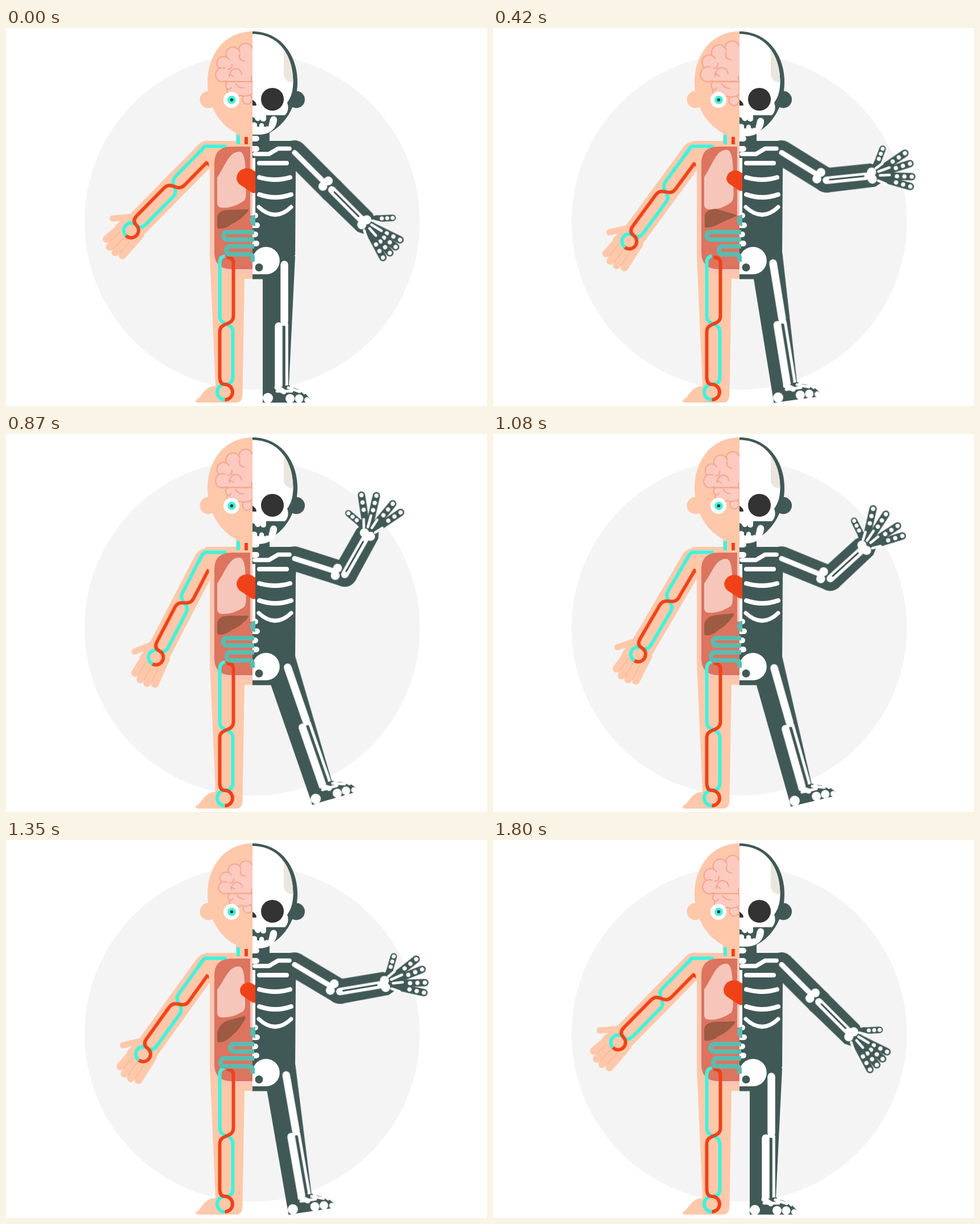
An HTML page for the animation above (1830 ms loop, 845 by 663 pixels).

```html
<!DOCTYPE html>
<html lang="en">
<head>
<meta charset="utf-8">
<title>Anatomy</title>
<style>
html, body { margin: 0; width: 100%; height: 100%; overflow: hidden; background: #fff; }
svg { display: block; width: 100%; height: 100%; }

.skin { fill: #ffc8aa; }
.dark { fill: #415956; }
.bone { fill: #fff; }
.skin-line, .dark-line, .bone-line, .vein, .artery, .gut, .fold { fill: none; }
.skin-line { stroke: #ffc8aa; stroke-linecap: round; }
.dark-line { stroke: #415956; stroke-linecap: round; }
.bone-line { stroke: #fff; stroke-linecap: round; stroke-linejoin: round; }
.vein { stroke: #3ef3dc; stroke-width: 6; }
.artery { stroke: #f04218; stroke-width: 6; }
.gut { stroke: #5bbbb0; stroke-width: 8; }
.lobe { fill: #fdcac0; stroke: #f2a58c; stroke-width: 2; }
.fold { stroke: #f2a58c; stroke-width: 2; }

/* 1800 ms of motion, then a 30 ms rest */
.swing, .cycle, .heart { animation: swing 1830ms steps(30) -2ms infinite; }
@keyframes swing {
  0%, 98.361%, 100% { transform: translateY(0px) rotate(0deg); }
  49.18% { transform: translateY(var(--y, 0px)) rotate(var(--a, 0deg)); }
}
.cycle { animation-name: cycle; animation-timing-function: steps(15); }
@keyframes cycle {
  0%, 49.18%, 98.361%, 100% { transform: scale(1, 1); }
  24.59% { transform: scale(var(--up)); }
  73.77% { transform: scale(var(--down)); }
}
.brain { transform-origin: 433px 94px; --up: 1.06, 1.07; --down: .92, .86; }
.lung { transform-origin: 371px 270px; --up: 1.02, 1.07; --down: .97, .91; }

.heart { animation-name: beat; transform-origin: 436px 268px; }
@keyframes beat {
  0%, 49.18% { transform: scale(1); animation-timing-function: ease-in; }
  24.59%, 73.77% { transform: scale(.81); animation-timing-function: ease-out; }
  98.361%, 100% { transform: scale(1); }
}
.liver { animation-name: liver; }
@keyframes liver {
  0%, 49.18%, 98.361%, 100% { d: path("M371 331 Q374 319 392 319 L425 318 Q428 319 421 326 Q409 339 396 344 Q386 353 374 352 Q371 352 371 348 Z"); }
  24.59% { d: path("M372 327 Q376 317 392 317 L426 328 Q430 330 424 332 Q410 337 396 344 Q386 350 374 350 Q372 350 372 346 Z"); }
  73.77% { d: path("M371 339 Q374 321 392 316 L418 309 Q422 309 420 314 Q409 334 398 342 Q386 355 375 355 Q371 355 371 350 Z"); }
}
.gut-top { animation-name: gut-top; }
@keyframes gut-top {
  0%, 49.18%, 98.361%, 100% { d: path("M436 358 H388 C380 358 380 371 388 371 H436"); }
  24.59% { d: path("M436 358 H381 C373 358 373 371 381 371 H436"); }
  73.77% { d: path("M436 358 H400 C392 358 392 371 400 371 H436"); }
}
.gut-low { animation-name: gut-low; }
@keyframes gut-low {
  0%, 49.18%, 98.361%, 100% { d: path("M436 383 H393 C385 383 385 397 393 397 H427 Q433 397 433 403 V410"); }
  24.59% { d: path("M436 383 H403.5 C395.5 383 395.5 397 403.5 397 H427 Q433 397 433 403 V410"); }
  73.77% { d: path("M436 383 H383 C375 383 375 397 383 397 H427 Q433 397 433 403 V410"); }
}
</style>
</head>
<body>
<svg viewBox="0 0 845 663">
  <defs>
    <clipPath id="left"><rect width="433" height="663"/></clipPath>
    <clipPath id="over"><rect width="438" height="663"/></clipPath>
    <clipPath id="right"><rect x="433" width="412" height="663"/></clipPath>
    <path id="head" d="M433 6 C483 6 512 48 512 95 C512 148 476 191 433 191 C390 191 354 148 354 95 C354 48 383 6 433 6 Z"/>
    <path id="cranium" d="M433 10.500 C481 10.500 504.500 50 504.500 95 C504 114 500 122 494 131 C497 139 496 147 490 153 H457 V159 Q457 164 452 164 Q448 164 447 160 Q445 164 441 163 Q438 162 437 158 L433 156 Z"/>
    <clipPath id="skull"><use href="#cranium"/></clipPath>
    <g id="finger">
      <path class="dark-line" stroke-width="13" d="M14 0 H70"/>
      <g class="bone"><circle cx="44" r="3.8"/><circle cx="57" r="3.8"/><circle cx="70" r="3.8"/></g>
    </g>
  </defs>

  <circle cx="432.5" cy="340" r="294.5" fill="#f4f4f4"/>

  <!-- flesh side -->
  <g transform="translate(364.400 229) rotate(134.6)">
    <g class="swing" style="--a:-17.7deg">
      <g transform="rotate(-134.6) translate(-10.400 -10) rotate(134.6)">
        <path class="skin-line" stroke-width="43" d="M0 0 H180"/>
        <path class="skin-line" stroke-width="11" d="M170 13 L199 38"/>
        <path class="skin-line" stroke-width="13.5" d="M190 16 L232 20 M190 6 L238 6.5 M190 -6 L238 -7 M185 -17 L233 -20"/>
        <path class="skin" d="M165 21 L205 26 L212 -25 L180 -21 Z"/>
        <path class="fold" style="stroke:#eab295;stroke-width:1" d="M206 12 L232 13.5 M207 0 H237 M206 -12 L233 -13.5"/>
        <path class="vein" stroke-linecap="round" d="M-4 11 H10"/>
        <path class="vein" d="M-4 11 H69 C87 11 79 -11 97 -11 H165 Q178 -11 178 0 A13 13 0 0 0 204 0"/>
        <path class="artery" d="M12 -18 L14 -11 H69 C87 -11 79 11 97 11 H165 Q178 11 178 0 A13 13 0 0 1 204 0"/>
      </g>
    </g>
  </g>
  <path fill="#f8c4b6" d="M361 250 V395 Q362 431 398 431 H433 V250 Z"/>
  <path class="skin" d="M433.500 198 H350 L358 250 V400 L368 628 C352 628 346 641 339 649 Q333 652 333 655 Q334 657 340 657 H404 Q415 657 415.500 643 L419 440 H433.500 Z"/>
  <path fill="#f8c4b6" d="M362 250 V393 Q364 431 398 431 H433 V250 Z"/>
  <rect class="skin" x="404" y="175" width="29.5" height="26"/>
  <path class="vein" d="M408 188 V204"/>
  <path class="artery" d="M422 191 V204"/>
  <path class="vein" stroke-linejoin="round" stroke-linecap="round" d="M385 207.500 H349 L344 213"/>

  <circle class="skin" cx="355.500" cy="125.500" r="15"/>
  <use class="skin" href="#head" clip-path="url(#left)"/>
  <g clip-path="url(#left)">
    <g class="cycle brain">
      <g class="lobe">
        <circle cx="424" cy="125" r="8.500"/>
        <path d="M433 94 H389 Q383 101 389 107 Q387 117 398 117 Q404 122 411 118 Q421 122 433 115 Z"/>
        <circle cx="421" cy="39" r="12"/>
        <circle cx="399" cy="46" r="12.500"/>
        <circle cx="382.500" cy="62" r="11.800"/>
        <circle cx="380.500" cy="82" r="12.300"/>
      </g>
      <path fill="#fdcac0" d="M440 34 L416 41 L402 48 L386 62 L384 92 H440 Z"/>
      <path class="fold" d="M383 94 H430 M392 86 Q394 71 404 71 Q413 72 414 82 M411 45 Q407 57 420 58 M389 72 Q398 73 397 63 M391 81 Q397 82 400 86 M433 94 Q430 91 432 84 M389 107 Q394 109 396 103 M403 97 Q409 106 418 105"/>
    </g>
  </g>
  <circle cx="396" cy="126" r="14" fill="#fff"/>
  <circle cx="396.500" cy="126" r="7.300" fill="#3ef3dc"/>
  <circle cx="396.500" cy="126" r="2.800" fill="#333"/>

  <path fill="#dc745f" d="M433 208 H396 Q366 208 366 238 V393 Q366 423 396 423 H433 Z"/>
  <rect x="429" y="208" width="5" height="121" fill="#f6c6ba"/>
  <path class="cycle lung" fill="#f6c6ba" d="M371 262 C386 241 391 217 410 217 C420 217 421 240 421 262 C421 285 424 299 417 304 Q397 317 378 315 Q371 314 371 307 Z"/>
  <path class="cycle liver" fill="#9c5b42" d="M371 331 Q374 319 392 319 L425 318 Q428 319 421 326 Q409 339 396 344 Q386 353 374 352 Q371 352 371 348 Z"/>

  <g transform="translate(387.500 402) rotate(90)">
    <path class="vein" d="M-2 3 Q-1 12 10 12 H103 C121 12 113 -11 131 -11 H210 Q223 -11 223 3 A13.500 13.500 0 0 0 250 3"/>
    <path class="artery" d="M0 0 Q0 -12 10 -12 H103 C121 -12 113 12 131 12 H210 Q223 12 223 3 A13.500 13.500 0 0 1 250 3"/>
  </g>

  <!-- bone side -->
  <path class="dark" d="M433 198 H512 L509 250 L508 398 L470 440.500 H433 Z"/>
  <rect class="dark" x="433" y="178" width="30" height="24"/>
  <circle class="dark" cx="510" cy="125.500" r="15"/>

  <g transform="translate(475 395)">
    <g class="swing" style="--a:-19.8deg">
      <path class="dark" d="M-24 5 H33 L22 232 L26 262 H-24 Z"/>
      <path class="bone-line" stroke-width="13.500" d="M14 20 V119 M4 128 V236"/>
      <path class="bone-line" stroke-width="5.500" d="M8 124.500 H18 V231"/>
      <path class="dark-line" stroke-width="1.500" d="M15 129 V230"/>
      <g transform="translate(-15 254)">
        <g class="swing" style="--a:3.3deg">
          <path class="dark" d="M30 -22 H37 Q47 -24 58 -17 L73 0 Q76 8 67 8 H-9 L-5 -8 Z"/>
          <path class="bone-line" stroke-width="9" d="M16 -19 L28 -11"/>
          <path class="bone-line" stroke-width="5" d="M16 -12 H42 M36 -18 L56 -11 M41 -21 Q55 -20 64 -9"/>
          <g class="bone"><circle r="9"/><circle cx="39" cy="1" r="8"/><circle cx="55" cy="1" r="7.500"/><circle cx="69" cy="3.500" r="5"/></g>
        </g>
      </g>
    </g>
  </g>

  <g transform="translate(507 218.500) rotate(45)">
    <g class="swing" style="--a:-28.4deg">
      <path class="dark-line" stroke-width="43" d="M0 0 H92"/>
      <g transform="translate(92.500 0)">
        <g class="swing" style="--a:-80.6deg">
          <circle class="dark" r="21.500"/>
          <path class="dark" d="M0 -21.500 H80 L92 -16 L96 14 L84 20 L0 21.500 Z"/>
          <path class="bone-line" stroke-width="13" d="M0 0 H76"/>
          <path class="dark-line" stroke-width="2.800" d="M6 -.5 H66"/>
          <g transform="translate(80.500 0)">
            <path class="dark-line" stroke-width="12" d="M4 -8 L11 -20"/>
            <g transform="translate(11 -20) rotate(-48)">
              <g class="swing" style="--a:-33deg">
                <path class="dark-line" stroke-width="11.500" d="M0 0 H28"/>
                <g class="bone"><circle cx="9" r="3.600"/><circle cx="18.500" r="3.600"/><circle cx="28" r="3.600"/></g>
              </g>
            </g>
            <g transform="rotate(-19)"><use class="swing" style="--a:-20deg" href="#finger"/></g>
            <g transform="rotate(-7)"><use class="swing" style="--a:-10deg" href="#finger"/></g>
            <g transform="rotate(5)"><use class="swing" style="--a:5deg" href="#finger"/></g>
            <g transform="rotate(17)"><use class="swing" style="--a:10deg" href="#finger"/></g>
            <path class="bone-line" stroke-width="4.500" d="M8 -12 L20 -19 M12 -6 L32 -11 M14 1 L31 2 M10 10 L23 17"/>
            <circle class="bone" cy="-6.200" r="8"/>
            <circle class="bone" cy="6.200" r="8"/>
          </g>
        </g>
      </g>
      <path class="bone-line" stroke-width="9" d="M0 0 H74"/>
      <circle class="bone" cx="77" cy="-6.800" r="7.800"/>
      <circle class="bone" cx="77" cy="6.800" r="7.800"/>
    </g>
  </g>

  <use class="dark" href="#head" clip-path="url(#right)"/>
  <use class="bone" href="#cranium"/>
  <path fill="#ebe6dd" clip-path="url(#skull)" d="M488 30 H510 V95 H500 Q488 92 488 80 Z"/>
  <circle cx="468" cy="125" r="20" fill="#333"/>
  <path fill="#333" d="M433 126 Q440 130 440 136 H433 Z"/>
  <g clip-path="url(#right)">
    <path class="bone swing" style="--y:6px" d="M433 166 Q438 164 441 168 V172 Q443 175 445 172 V169 Q449 164 453 169 V172 Q455 175 458 172 L461 173 L464 160 Q466 154 472 155 Q477 157 476 163 C474 178 462 187 445 187 H433 Z"/>

    <path class="bone-line" stroke-width="10" d="M433 194 H440 M433 212 H440 M433 329 H438 M433 346 H441 M433 362 H438 M433 378 H440"/>
    <rect class="bone" x="433" y="228" width="5" height="98"/>
    <path class="bone-line" stroke-width="7.500" d="M437 221 H462 L478 211.500 H498"/>
    <path class="bone-line" stroke-width="8" d="M445 237 H493 M445 262 Q473 270 499 262 M445 292 Q473 302 501 292"/>
    <path class="bone-line" stroke-width="7" d="M444 314 Q473 341 501 314"/>
    <path class="bone" d="M433 405 A24 24 0 1 1 457 432 H433 Z"/>
    <circle class="dark" cx="444.500" cy="420" r="7"/>
  </g>

  <!-- organs crossing the midline -->
  <path fill="#5bbbb0" d="M438 327.500 A9.500 10 0 0 0 438 347.500 Z"/>
  <path class="gut cycle gut-top" d="M436 358 H388 C380 358 380 371 388 371 H436"/>
  <path class="gut cycle gut-low" d="M436 383 H393 C385 383 385 397 393 397 H427 Q433 397 433 403 V410"/>
  <g clip-path="url(#over)">
    <path class="heart" fill="#f04218" d="M436 251 C428 243 414 245 408 254 C403 262 405 269 410 274 L431 288 Q436 291 441 288 V251 Z"/>
  </g>
</svg>
</body>
</html>
```
